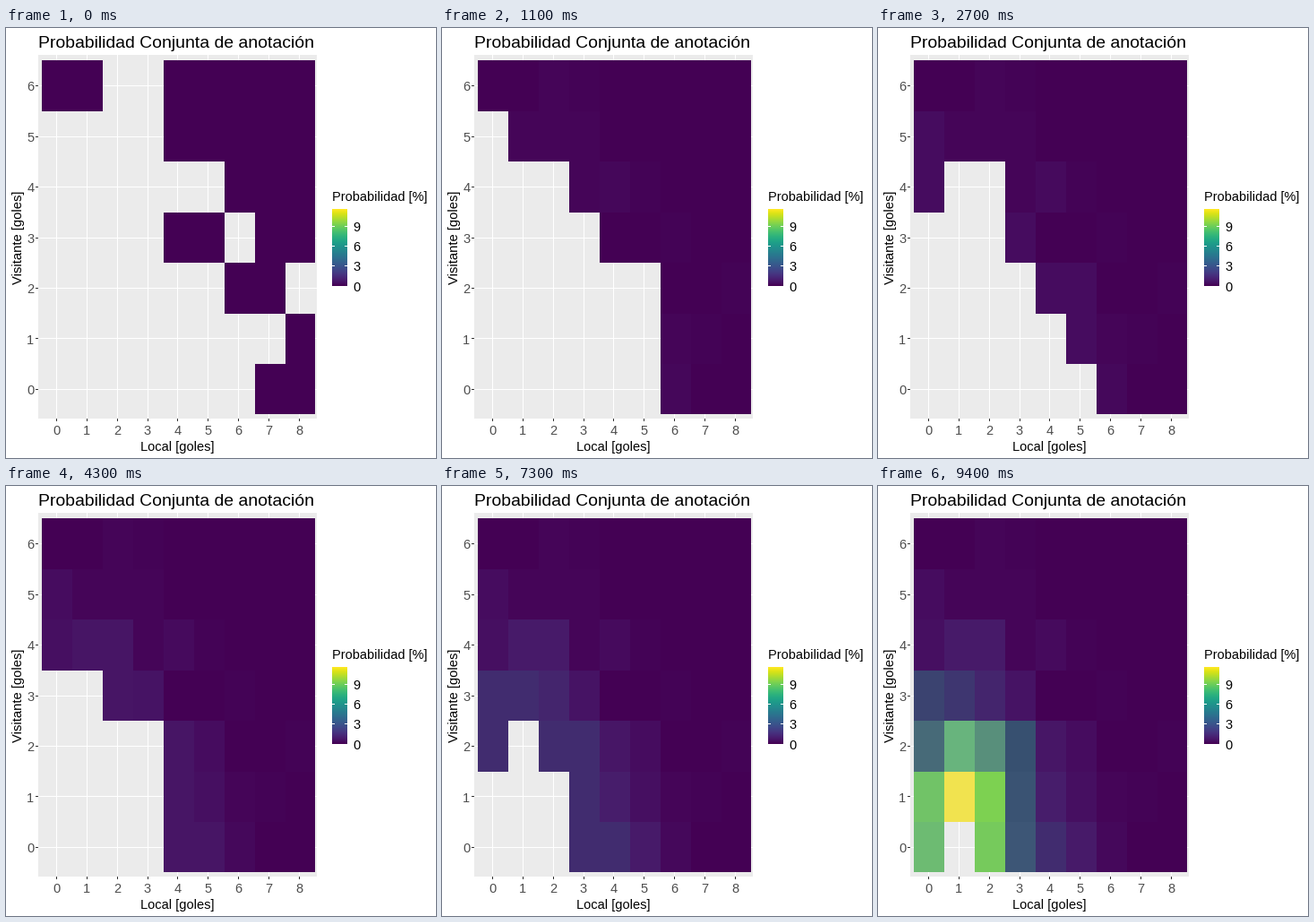
These frames come from a looping animation (480x480 px, 9700 ms). A matplotlib script:

```python
import numpy as np
import matplotlib.pyplot as plt
from matplotlib.animation import FuncAnimation
from matplotlib.colors import LinearSegmentedColormap
from matplotlib.patches import Rectangle

SIZE, DPI, STEP, LOOP = 480, 100, 100, 9700
COLS, ROWS = 9, 7

plt.rcParams["font.family"] = "Liberation Sans"
fig = plt.figure(figsize=(SIZE / DPI, SIZE / DPI), dpi=DPI, facecolor="white")
ax = fig.add_axes([0, 0, 1, 1])
ax.axis("off")

# Muted viridis over the tiles' rank, 0 (impossible) to 1 (likeliest drawn)
RAMP = LinearSegmentedColormap.from_list("tiles", [
    (0, "#440154"), (.2, "#460c5f"), (.4, "#471d6b"), (.5, "#403070"),
    (.6, "#375070"), (.7, "#3f5777"), (.8, "#68b47d"), (.96, "#7ad151"),
    (1, "#f1e34f")], N=1024)

# Scores as local-visitante digits, rarest first; ties share a group.
# Scores not listed never happened and are there from the start.
ORDER = ("36,54,63,82,71 26,15,25,35,34,61 60 44 05,52 04,51 33 42 14,24,50 "
         "41 23 40 13 03 32 31 30 02 22 12 00 01 20 21 11 10").split()
# The last group is due just as the loop closes, so it stays empty
GAPS = [100, 200] + [400] * 12 + [600] + [400] * 4 + [200, 400] + [300] * 4 + [600]
times = np.cumsum(GAPS)
TOP = len(ORDER) - 1

start = np.zeros((ROWS, COLS))
rank = np.zeros((ROWS, COLS))
for k, group in enumerate(ORDER):
    for score in group.split(","):
        x, y = map(int, score)
        start[ROWS - 1 - y, x] = times[k]
        rank[ROWS - 1 - y, x] = (k + 1) / TOP


def box(x, y, w, h, color, z=1):
    ax.add_patch(Rectangle((x, y), w, h, fc=color, lw=0,
                           antialiased=False, zorder=z))


def label(x, y, text, px=14.6, color="black", **kw):
    ax.text(x, y, text, fontsize=px * 72 / DPI, color=color,
            va="baseline", **kw)


# Panel, grid, ticks
box(36, 30, 311, 406, "#ebebeb")
for i in range(COLS):
    cx = 56.4 + 33.87 * i
    box(int(cx), 30, 1, 406, "white", 2)
    box(int(cx), 436, 1, 3, "#333333", 2)
    label(cx, 454, str(i), color="#4d4d4d", ha="center")
for i in range(ROWS):
    cy = 403.4 - 56.45 * i
    box(36, int(cy), 311, 1, "white", 2)
    box(33, int(cy), 3, 1, "#333333", 2)
    label(31.5, cy + 5.6, str(i), color="#4d4d4d", ha="right")

label(36, 21.5, "Probabilidad Conjunta de anotación", 19.35)
label(191.3, 472, "Local [goles]", ha="center")
label(18, 233.5, "Visitante [goles]", 14.8, rotation=90,
      rotation_mode="anchor", ha="center")

# Colour key
label(364, 193, "Probabilidad [%]", 14.5)
ax.imshow(np.linspace(1, 0, 86)[:, None], cmap="viridis", aspect="auto",
          extent=(364, 381, 288, 202), interpolation="nearest", zorder=1)
for i in range(4):
    ky = 288 - 22.3 * i
    if i:
        for kx in (364, 378):
            box(kx, int(ky), 3, 1, "white", 2)
    label(387.5, ky + 5.6, str(3 * i))

x_edges = np.round(40.1 + 33.93 * np.arange(COLS + 1))
y_edges = np.round(36.3 + 56.45 * np.arange(ROWS + 1))
tiles = ax.pcolormesh(x_edges, y_edges, rank, cmap=RAMP, vmin=0, vmax=1,
                      antialiased=False, linewidth=0, zorder=3)
ax.set_xlim(0, SIZE)
ax.set_ylim(SIZE, 0)


def draw(frame):
    now = frame * STEP
    # Tiles stay dim until the first green ones arrive
    newest = np.count_nonzero(times <= now) / TOP
    cap = newest if newest >= .8 else .63 * newest
    tiles.set_array(np.ma.masked_where(start > now, np.minimum(rank, cap)))
    return [tiles]


anim = FuncAnimation(fig, draw, frames=LOOP // STEP, interval=STEP,
                     repeat=True, repeat_delay=0)
plt.show()
```
